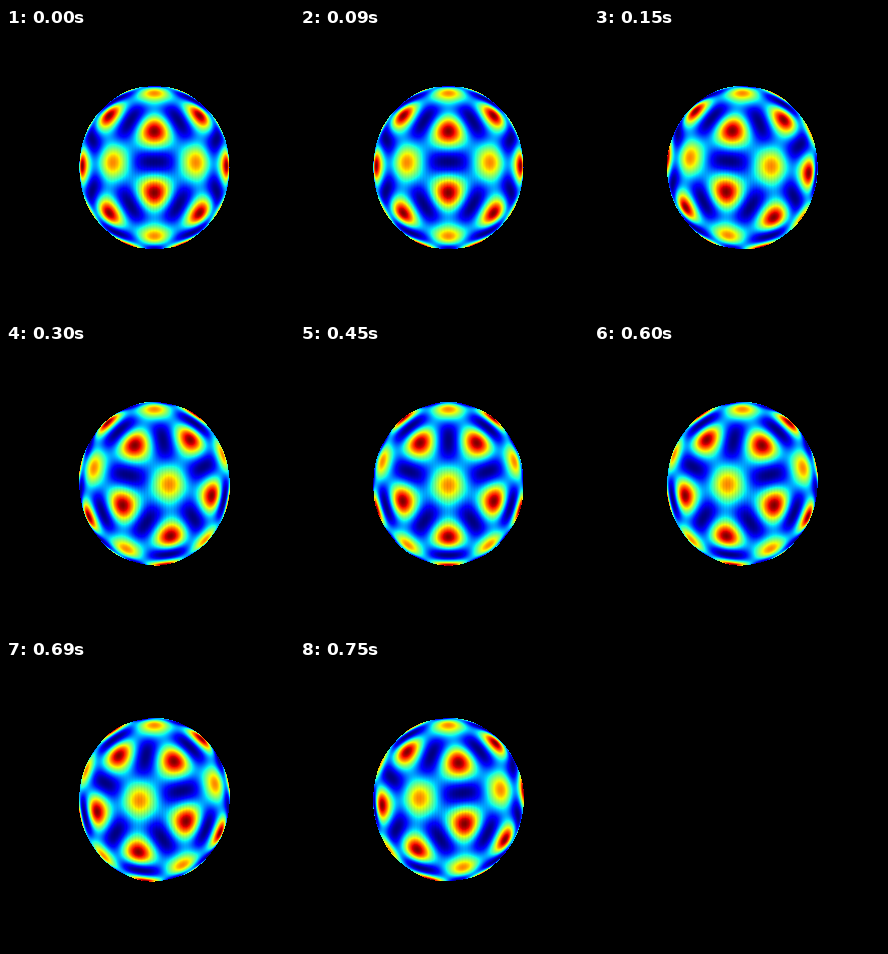
These frames come from a looping animation (288x288 px, 0.9 s). An HTML page with a canvas:

```html
<!DOCTYPE html>
<html lang="en">
<head>
<meta charset="utf-8">
<title>Spherical harmonic</title>
<style>
  html, body { margin: 0; width: 100%; height: 100%; overflow: hidden; background: #000; }
  canvas { display: block; width: 288px; height: 288px; }
</style>
</head>
<body>
<canvas id="stage" width="288" height="288"></canvas>
<script>
const SIZE = 288, STEPS = 6, HOLD = 150;
const CX = 148.4, CY = 140, RADIUS = 75.2;
const TILT = Math.PI / 6, STRETCH = 1.11;     // camera elevation, z scale
const DIST = 20;                              // camera distance in radii
const BUMP = 0.006;
const LOW = -0.775, HIGH = 1.221;             // range of the harmonic
const COS = Math.cos(TILT), SIN = Math.sin(TILT), RAD = Math.PI / 180;

const ctx = document.getElementById('stage').getContext('2d');
const clamp = v => Math.max(0, Math.min(1, v));

// Legendre polynomial of degree 10, in q = x * x
const p10 = q =>
  (((((46189 * q - 109395) * q + 90090) * q - 30030) * q + 3465) * q - 63) / 256;

// Six five-fold axes of an icosahedron turned about its pole
function axes(turn) {
  const list = [[0, 0, 1]], z = 1 / Math.sqrt(5);
  for (let i = 0; i < 5; i++) {
    const a = turn + i * 72 * RAD;
    list.push([2 * z * Math.sin(a), 2 * z * Math.cos(a), z]);
  }
  return list;
}

function harmonic(list, x, y, z) {
  const n = x * x + y * y + z * z;
  let sum = 0;
  for (const a of list) {
    const dot = a[0] * x + a[1] * y + a[2] * z;
    sum += p10(dot * dot / n);
  }
  return sum;
}

function jet(v) {
  return [
    v < 0.775 ? clamp((v - 0.35) / 0.31) : clamp(1 - (v - 0.89) / 0.22),
    Math.min(clamp((v - 0.125) / 0.25), clamp((0.91 - v) / 0.27)),
    v < 0.2 ? clamp(0.5 + v / 0.22) : clamp((0.65 - v) / 0.31)
  ];
}

// Harmonic value where the view ray through (u, v) meets the surface, or null
function trace(list, u, v) {
  let depth = 1.1;
  for (let i = 0; i < 80 && depth > -0.3; i++) {
    const scale = 1 - depth / DIST, up = v * scale;
    const x = u * scale;
    const y = depth * COS - up * SIN;
    const z = (up * COS + depth * SIN) / STRETCH;
    const s = harmonic(list, x, y, z);
    const gap = Math.hypot(x, y, z) - 1 - BUMP * s;
    if (gap < 0.001) return s;
    depth -= gap * 0.9;
  }
  return null;
}

function render(step) {
  const image = ctx.createImageData(SIZE, SIZE), px = image.data;
  const list = axes((36 - 12 * step) * RAD);
  for (let y = 0; y < SIZE; y++) {
    for (let x = 0; x < SIZE; x++) {
      const i = (y * SIZE + x) * 4;
      px[i + 3] = 255;
      const u = (x + 0.5 - CX) / RADIUS, v = (CY - y - 0.5) / RADIUS;
      if (u * u + v * v > 1.3) continue;
      const s = trace(list, u, v);
      if (s === null) continue;
      // faint vertical mesh lines on the side facing the viewer
      const mesh = 1 - 0.05 * Math.exp(-3 * (u * u + (v + 0.2) ** 2)) * (x % 3 === 0);
      const rgb = jet(clamp((s - LOW) / (HIGH - LOW)) ** 1.1);
      for (let c = 0; c < 3; c++) px[i + c] = 255 * rgb[c] * mesh;
    }
  }
  return image;
}

const poses = Array.from({ length: STEPS }, (_, i) => render(i));
let start = null;

function draw(now) {
  if (start === null) start = now;
  ctx.putImageData(poses[Math.floor((now - start) / HOLD) % STEPS], 0, 0);
  requestAnimationFrame(draw);
}
ctx.putImageData(poses[0], 0, 0);
requestAnimationFrame(draw);
</script>
</body>
</html>
```
